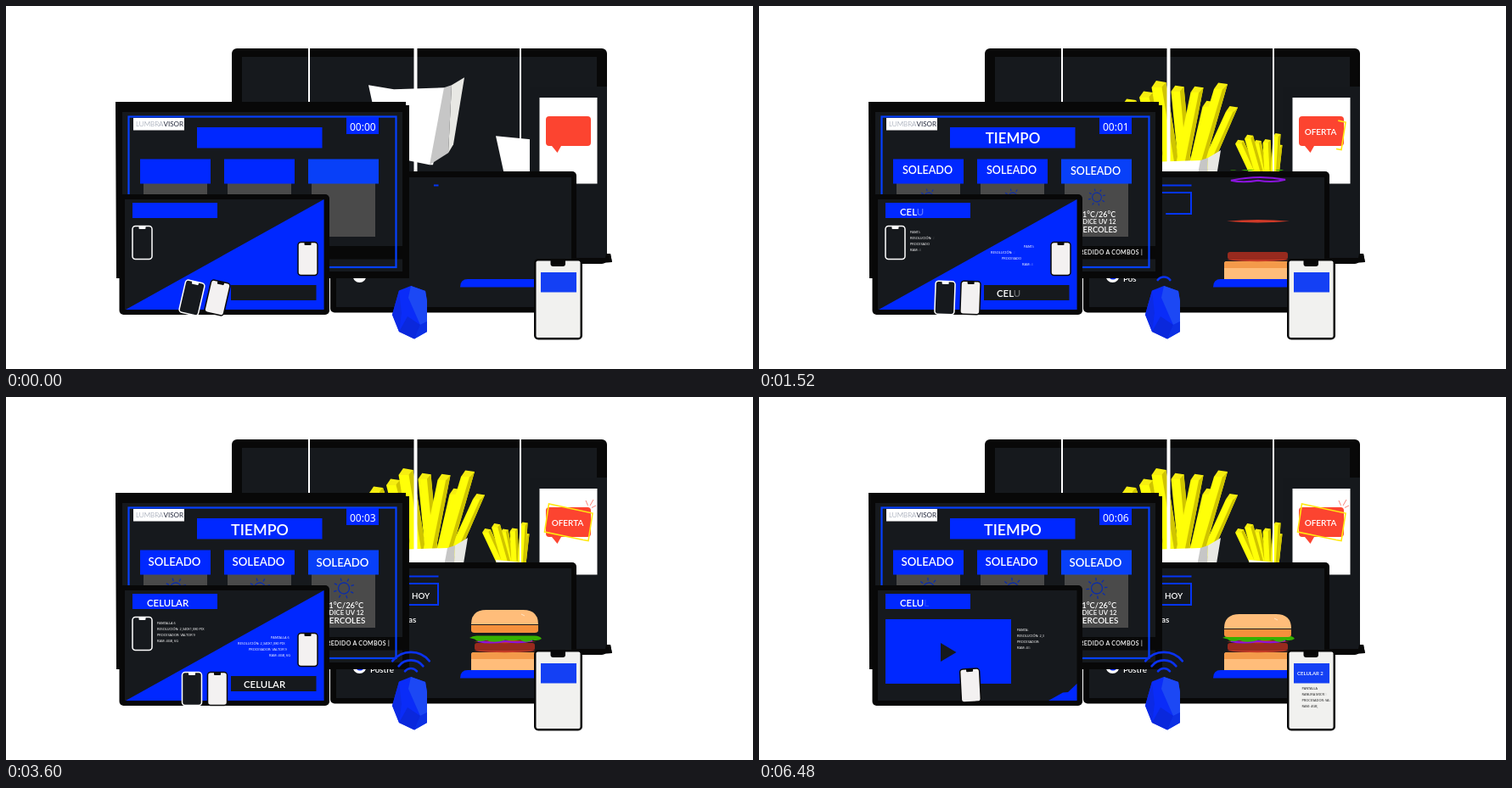
An HTML page for the animation above (6.52 s loop, 880x428 px).

```html
<!DOCTYPE html>
<html lang="es">
<head>
<meta charset="utf-8">
<title>Pantallas digitales</title>
<style>
html, body { margin: 0; width: 100%; height: 100%; overflow: hidden; background: #fff; }
svg { display: block; width: 880px; height: 428px; font-family: Lato, "Open Sans", sans-serif; font-weight: 600; }
text { fill: #fff; white-space: pre; }
.bezel { fill: #080808; }
.screen { fill: #16191d; }
.blue { fill: #0028ff; }
.line { fill: none; stroke: #0535f5; stroke-width: 2; }
.mid { text-anchor: middle; }
.tiny { font: 500 3.9px "Noto Sans", sans-serif; }
.sun { fill: none; stroke: #0a2cac; stroke-width: 1.3; }
</style>
</head>
<body>
<svg viewBox="0 0 880 428">
  <defs>
    <clipPath id="wallClip"><path d="M278 60H696V200H278Z"/></clipPath>
    <clipPath id="monitorClip"><path d="M380 193H672V362H380Z"/></clipPath>
    <g id="sunShape"></g>
  </defs>

  <!-- video wall -->
  <rect class="bezel" x="266" y="50" width="442" height="254" rx="6"/>
  <rect class="screen" x="278" y="60" width="418" height="232"/>
  <g clip-path="url(#wallClip)">
    <g id="bigFries"></g>
    <g id="bigBox">
      <path d="M427 93L457 98L516 96L522 99L503 187L499 187L474 182L445 176Z" fill="#fff"/>
      <path d="M516 96L525 93L521 173L499 187Z" fill="#c6c6c6"/>
      <path d="M525 93L540 84L527 163L521 173Z" fill="#e8e8e4"/>
    </g>
    <g id="smallFries"></g>
    <path id="smallBox" d="M577 153L618 157V240H596Z" fill="#fff"/>
  </g>
  <path d="M356 50h2v70h-2zM480.5 50h4v150h-4zM605 50h2v150h-2z" fill="#fff"/>

  <!-- poster -->
  <path d="M617 95H708V292H712L714 302L676 304H617Z" fill="#15181c"/>
  <path class="bezel" d="M672 297H706L707 292H712L714 302L676 304H672Z"/>
  <rect x="628.500" y="108" width="68" height="101.500" fill="#fff"/>
  <path d="M640 130H685Q689 130 689 134V161Q689 165 685 165H654L649.500 173L643 165H640Q636 165 636 161V134Q636 130 640 130Z" fill="#fc4430"/>
  <text id="offer" class="mid" x="661.500" y="152" font-size="10">OFERTA</text>
  <path id="outline" d="M680 168.500L686 169.500L691 137L639.500 126L634.500 159L680 168.500" pathLength="100" fill="none" stroke="#ffe810" stroke-width="1.600"/>
  <path id="rays" d="M683 122L685.500 128M692 121L688 128M695 128L690 130.500" stroke="#fc8478" stroke-width="1" fill="none"/>

  <!-- menu monitor -->
  <rect class="bezel" x="382" y="195" width="290" height="166.500" rx="5"/>
  <rect class="screen" x="389" y="202" width="277" height="153"/>
  <path id="rule" class="line"/>
  <path id="menuBox" class="line" d="M474 220H509V245H474" pathLength="94"/>
  <text id="today" x="478" y="237.500" font-size="9.800"></text>
  <text id="dish" x="474" y="266" font-size="10"></text>
  <circle cx="416.500" cy="318" r="8" fill="#fff"/>
  <circle id="dot" class="blue" cx="417" cy="317" r="5.500"/>
  <text id="dessert" x="429" y="325" font-size="9.800"></text>
  <path d="M535 331.500Q535 322 544 322H640V331.500Z" class="blue"/>
  <g clip-path="url(#monitorClip)">
    <g id="base"><path d="M548 322V304Q548 301 551 301H640V322Z" fill="#ffbd7a"/><path d="M548 309V304Q548 301 551 301H640V309Z" fill="#f49a4a"/></g>
    <g id="tomatoLow"><path d="M551 299.500Q587 296 625 299.500Q587 303 551 299.500Z" fill="#c43a26"/></g>
    <g id="meat"><rect x="552" y="290" width="71" height="9" rx="3" fill="#982a1e"/></g>
    <g id="tomatoTop"><path d="M551 288.500Q587 285 625 288.500Q587 292 551 288.500Z" fill="#d03a28"/></g>
    <g id="onion"><path d="M556 288Q588 281 620 287Q606 291 588 288Q570 291 556 288Z" fill="none" stroke="#8a14dc" stroke-width="2"/></g>
    <g id="lettuce"><path d="M546 284Q550 281 556 281.500H621Q629 281 631 285Q627 288 620 286.500Q613 291 606 286.500Q596 288 588 286.500Q574 291 566 286.500Q556 290 552 285.500Z" fill="#36b000"/></g>
    <g id="bun"><path d="M548 273Q548 256 566 256H609Q627 256 627 273Z" fill="#ffbd7a"/><path d="M548 274H627V280Q627 283 623 283H552Q548 283 548 280Z" fill="#f5903c"/><path d="M607 261l4 2" stroke="#ffe4c4"/></g>
  </g>

  <!-- weather screen -->
  <path class="bezel" d="M129 113H471V117H475V321H130Z"/>
  <rect class="screen" x="137" y="125" width="330" height="188"/>
  <rect x="137" y="283" width="330" height="15.500" fill="#080808"/>
  <rect x="144.500" y="130.500" width="315" height="177.500" fill="none" stroke="#0540ff" stroke-width="2.200"/>
  <rect x="150" y="132" width="60" height="14.500" fill="#fff"/>
  <text x="153" y="142" font-size="8.100" font-weight="300" style="fill:#7c8598">LUMBRA<tspan fill="#20263a" font-weight="400">VISOR</tspan></text>
  <rect class="blue" x="401" y="131" width="38" height="20"/>
  <text id="clock" x="405" y="146.500" font-size="12" font-weight="400" font-family="Noto Sans, sans-serif"></text>
  <rect class="blue" x="225" y="143" width="147.500" height="24.500"/>
  <g id="cards"></g>
  <text class="mid pop" data-x="299" data-y="156" y="6.500" font-size="17.800">TIEMPO</text>
  <text class="mid pop" data-x="398" data-y="246" y="3" font-size="9.400">21°C/26°C</text>
  <text class="mid pop" data-x="397" data-y="254" y="2.700" font-size="7.700">ÍNDICE UV 12</text>
  <text class="mid pop" data-x="396" data-y="263.500" y="3.500" font-size="9.900">MIERCOLES</text>
  <text id="ticker" x="452" y="293" font-size="7" letter-spacing=".3" text-anchor="end">AGREDIDO A COMBOS |</text>

  <!-- phone shop screen -->
  <rect class="bezel" x="133.500" y="222" width="247.500" height="142" rx="5"/>
  <rect class="screen" x="140" y="228" width="234.500" height="130"/>
  <rect class="blue" x="149" y="232" width="100" height="18"/>
  <text id="titleA" x="166" y="246.500" font-size="11.400"></text>
  <g id="sceneA">
    <path class="blue" d="M141 358L374.500 228V358Z"/>
    <rect class="screen" x="265" y="329" width="100.500" height="18"/>
    <text id="titleB" x="280" y="343" font-size="11.400"></text>
  </g>
  <g id="sceneB">
    <rect class="blue" x="149" y="262" width="148" height="76"/>
    <path class="screen" d="M214 290L232.500 301L214 312Z"/>
    <path class="blue" d="M341 358L358 348.500L364 348L374.500 338V358Z"/>
  </g>

  <!-- beacon -->
  <g id="waves" fill="none" stroke="#0a32f0" stroke-width="2.600" stroke-linecap="round"></g>
  <path d="M463 335.500L477 330L494 336L496 348V384L481 392.500L463 384L455 364Z" fill="#0a2cf8"/>
  <path d="M477 330L494 336L496 348V372L488 376L474 344Z" fill="#1c48f4"/>
  <path d="M463 384L473 366L488 376L481 392.500Z" fill="#0a28dc"/>
  <path d="M496 372V384L481 392.500L488 376Z" fill="#0c30e4"/>
  <path d="M455 364L463 335.500L466 362L463 384Z" fill="#0c2ae4"/>

  <!-- handset -->
  <rect class="bezel" x="622" y="298" width="57" height="95.500" rx="5"/>
  <rect x="624.500" y="300.500" width="52" height="90.500" rx="2" fill="#f1f1ef"/>
  <path class="bezel" d="M641.500 299H659V304Q659 307 656 307H644.500Q641.500 307 641.500 304Z"/>
  <rect x="630" y="314" width="42" height="23.500" fill="#1440f4"/>
  <text id="handTitle" x="634" y="328" font-size="6"></text>
  <g id="handLines"></g>
</svg>
<script>
const LOOP = 6520, SCENE_B = 4560, BOX_FALL = 82;
const $ = id => document.getElementById(id);
const add = (parent, markup) => $(parent).insertAdjacentHTML("beforeend", markup);

// Linear value along [time, value, time, value, ...]
function at(t, ...k) {
  if (t <= k[0]) return k[1];
  for (let i = 2; i < k.length; i += 2) {
    if (t < k[i]) return k[i - 1] + (k[i + 1] - k[i - 1]) * (t - k[i - 2]) / (k[i] - k[i - 2]);
  }
  return k[k.length - 1];
}
const move = (id, y, x = 0) => $(id).setAttribute("transform", `translate(${x} ${y})`);
const show = (id, on) => $(id).setAttribute("visibility", on ? "visible" : "hidden");
const fade = (id, v) => $(id).setAttribute("opacity", v);

// Types n letters, the last one fading in
function type(el, str, n) {
  const whole = Math.floor(n);
  el.innerHTML = str.slice(0, whole) + `<tspan fill-opacity="${(n - whole).toFixed(2)}">${str.charAt(whole)}</tspan>`;
}

function fry(parent, x, y, bx, by, w) {
  const h = w / 2, s = w * 0.18;
  add(parent, `<path d="M${x - h} ${y + s}L${x + h} ${y - s}L${bx + h} ${by}H${bx - h}Z" fill="#ffff08"/>
    <path d="M${x + s} ${y}L${x + h} ${y - s}L${bx + h} ${by}H${bx + s}Z" fill="#cfc400"/>
    <path d="M${x - h} ${y + s}L${x - s} ${y - s * 1.6}L${x + h} ${y - s}L${x + s} ${y + s}Z" fill="#f6ee10"/>`);
}
[[436, 110, 474, 16], [456, 101, 482, 16], [471, 89, 491, 17], [493, 94, 504, 15], [530, 112, 508, 15],
 [516, 95, 493, 15], [557, 118, 516, 14], [544, 91, 509, 16]]
  .forEach(([x, y, bx, w]) => fry("bigFries", x, y, bx, 210, w));
[[566, 158, 592, 10], [587, 158, 598, 9], [577, 152, 595, 10], [612, 163, 606, 9], [598, 157, 601, 9], [610, 150, 606, 9]]
  .forEach(([x, y, bx, w]) => fry("smallFries", x, y, bx, 215, w));

add("sunShape", '<circle r="6.500"/>' + [...Array(8)].map((_, i) =>
  `<path d="M0 -9V-12.500" transform="rotate(${i * 45})"/>`).join(""));
[158, 257, 356].forEach((x, i) => add("cards", `
  <rect x="${x + 4}" y="209" width="75" height="63" fill="#4a4a4a"/>
  <rect x="${x}" y="180.500" width="83" height="29" fill="${i < 2 ? "#0028ff" : "#0840f8"}"/>
  <use href="#sunShape" class="sun" data-x="${x + 42}"/>
  <text class="mid pop" data-x="${x + 40.5}" data-y="${i < 2 ? 194 : 195}" y="4.700" font-size="13.200">SOLEADO</text>`));

function handset(parent, x, y, dark, id = "") {
  const [body, edge, notch] = dark ? ["#16191d", "#fff", "#fff"] : ["#f3f1f1", "#0a0a0a", "#0a0a0a"];
  add(parent, `<g transform="translate(${x} ${y})"><g class="${id}">
    <rect x="-11.500" y="-19.500" width="23" height="39" rx="3.500" fill="${body}" stroke="${edge}" stroke-width="1.500"/>
    <path d="M-4 -19.500H4V-17Q4 -16 3 -16H-3Q-4 -16 -4 -17Z" fill="${notch}"/></g></g>`);
}
handset("sceneA", 160.5, 279, true);
handset("sceneA", 355.5, 298, false);
handset("sceneA", 219, 344, true, "swing");
handset("sceneA", 249, 344, false, "swing");
handset("sceneB", 249, 340, false, "swing");

const SPECS = ["PANTALLA 6", "RESOLUCIÓN: 2,340X1,080 PIX", "PROCESADOR: VALTOR 9", "RAM: 4GB, 6G"];
const HAND_SPECS = ["PANTALLA 5", "RANURA MICROSD", "PROCESADOR: VALTOR", "RAM: 4GB, 6G"];
const specLines = [];
function specs(parent, xs, y, list, key, fill = "#fff") {
  list.forEach((str, i) => {
    add(parent, `<text class="tiny" x="${xs[i % xs.length]}" y="${y + i * 7}" style="fill:${fill}"></text>`);
    specLines.push({ el: $(parent).lastElementChild, str, key });
  });
}
specs("sceneA", [178], 268, SPECS, "shop");
specs("sceneA", [312, 273, 286, 310], 285, SPECS, "shop");
specs("sceneB", [304], 276, SPECS, "shop");
specs("handLines", [639.5], 345, HAND_SPECS, "hand", "#222");

for (let i = 0; i < 3; i++) add("waves", "<path/>");
const waves = [...$("waves").children];
const pops = [...document.querySelectorAll(".pop")];
const suns = [...document.querySelectorAll(".sun")];
const swings = [...document.querySelectorAll(".swing")];

function drawWall(t) {
  const rise = at(t, 640, 125, 860, 50, 1080, 17, 1400, 5, 2000, 0);
  move("bigFries", rise);
  move("smallFries", rise * 0.65);
  const falling = t < 640;
  move("bigBox", falling ? at(t, 0, 0, 200, 60, 450, BOX_FALL + 125) : BOX_FALL + rise, at(t, 0, 0, 450, 4));
  move("smallBox", falling ? at(t, 0, 0, 400, 70) : 39 + rise * 0.65);
  fade("offer", at(t, 400, 0, 800, 1));
  const drawn = at(t, 800, 0, 1080, 15, 2000, 42, 2720, 82, 3400, 100);
  $("outline").setAttribute("stroke-dasharray", `${drawn} 200`);
  show("outline", drawn > 0);
  fade("rays", at(t, 3200, 0, 3560, 1));
}

function drawMenu(t) {
  $("rule").setAttribute("d", `M509.500 211.500H${at(t, 0, 504, 500, 474)}`);
  const edge = at(t, 400, 0, 1080, 60, 1600, 94);
  $("menuBox").setAttribute("stroke-dasharray", `${edge} 200`);
  show("menuBox", edge > 0);
  type($("today"), "HOY", at(t, 1950, 0, 2500, 3));
  type($("dish"), "as", at(t, 2200, 0, 2640, 2));
  type($("dessert"), "Postre", at(t, 800, 0, 1080, 1.6, 2000, 4.5, 2720, 5.5, 3300, 6));
  fade("dot", at(t, 500, 0, 1000, 1));
  move("base", at(t, 200, -130, 900, 0));
  move("tomatoLow", at(t, 560, -110, 1080, -27, 1400, 0));
  move("meat", at(t, 600, -110, 1080, -32, 1500, 0));
  move("tomatoTop", at(t, 960, -110, 1080, -90, 1800, 0));
  move("onion", at(t, 1300, -110, 2000, -22, 2720, -1, 2900, 0));
  move("lettuce", at(t, 1400, -110, 2000, -33, 2720, -16, 3500, 0));
  move("bun", at(t, 1800, -100, 2000, -80, 2720, -23, 3600, -5, 3960, 0));
}

function drawWeather(t) {
  $("clock").textContent = "00:0" + Math.floor(t / 1000);
  const size = at(t, 500, 0, 1080, 0.79, 1500, 0.95, 1800, 1);
  pops.forEach(el => el.setAttribute("transform", `translate(${el.dataset.x} ${el.dataset.y}) scale(${size})`));
  const glow = at(t, 500, 0, 1080, 0.55, 1800, 1);
  suns.forEach(el => el.setAttribute("transform",
    `translate(${el.dataset.x} 225.500) rotate(${t * 0.02}) scale(${glow})`));
  fade("ticker", at(t, 400, 0, 900, 1));
}

function drawShop(t) {
  const second = t >= SCENE_B, s = second ? t - SCENE_B : t;
  show("sceneA", !second);
  show("sceneB", second);
  const letters = at(s, 500, 0, 1080, 2.5, 2000, 4.3, 2720, 5.8, 3500, 7);
  type($("titleA"), "CELULAR", letters);
  type($("titleB"), "CELULAR", letters);
  const angle = at(s, 0, 13, 500, 12, 1080, 7, 1700, 0, 2000, -4, 2400, -7, 2720, -6, 3500, 0);
  swings.forEach(el => el.setAttribute("transform", `rotate(${angle})`));
  const part = {
    shop: at(s, 500, 0, 1080, 0.34, 2000, 0.57, 2720, 0.76, 3600, 1),
    hand: at(t, 4900, 0, 6480, 0.8)
  };
  specLines.forEach(l => type(l.el, l.str, l.str.length * part[l.key]));
  type($("handTitle"), "CELULAR 2", at(t, 3900, 0, 4640, 3, 6200, 9));
}

function drawWaves(t) {
  const outer = at(t, 600, 0, 1080, 7, 2000, 12, 2720, 20, 3500, 28);
  const gap = at(t, 2000, 6.5, 2720, 7, 3500, 9.5);
  waves.forEach((el, i) => {
    const r = outer - i * gap, x = r * 0.78, y = 329 - r * 0.63;
    el.setAttribute("d", r < 4 ? "" : `M${477 - x} ${y}A${r} ${r} 0 0 1 ${477 + x} ${y}`);
  });
}

const start = performance.now();
function frame(now) {
  const t = Math.max(0, now - start) % LOOP;
  [drawWall, drawMenu, drawWeather, drawShop, drawWaves].forEach(draw => draw(t));
  requestAnimationFrame(frame);
}
frame(start);
</script>
</body>
</html>
```
